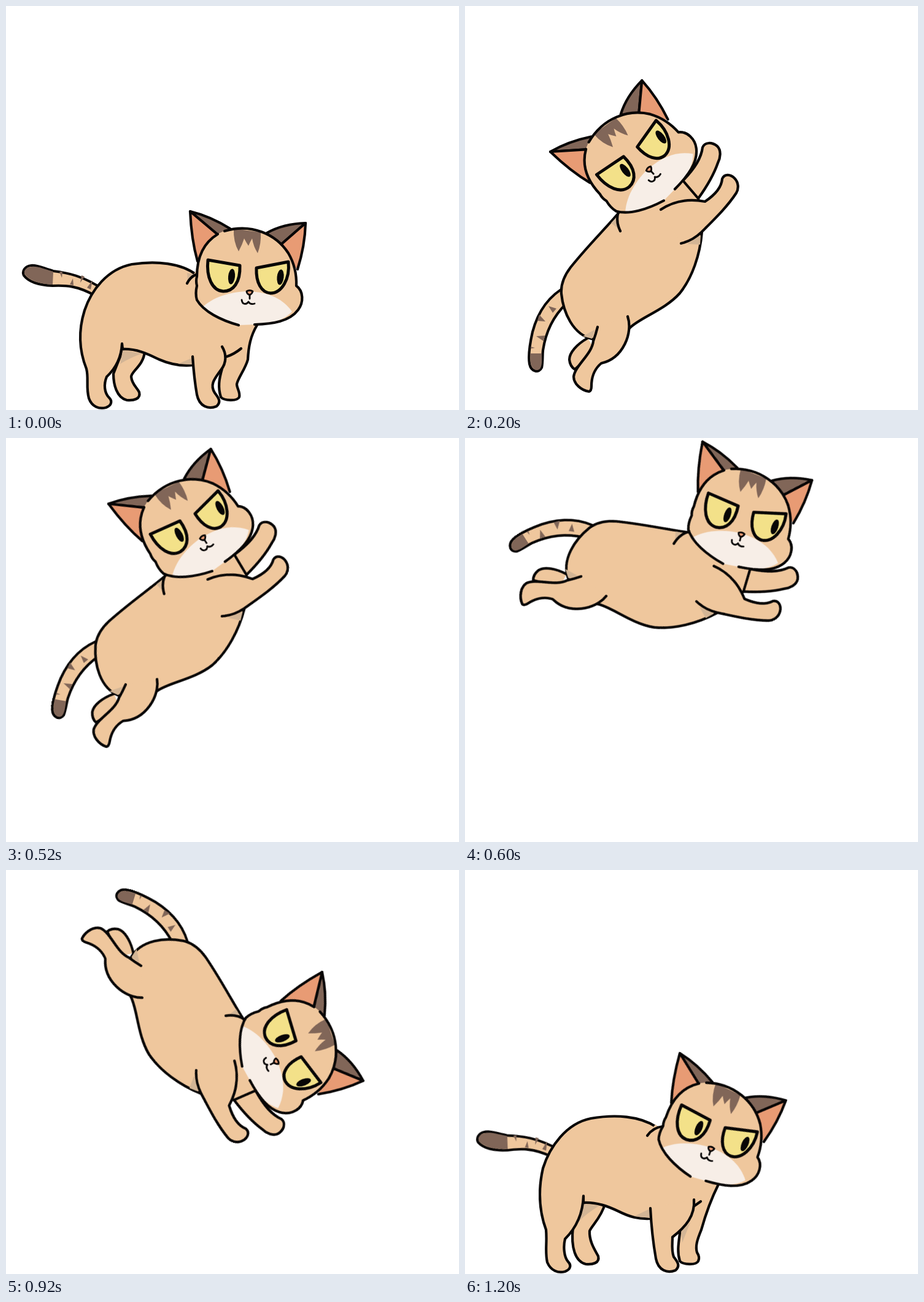
An HTML page without scripts that plays this animation: 738x657 px, repeating every 1.4 s.

```html
<!DOCTYPE html>
<html lang="en">
<head>
<meta charset="utf-8">
<title>Leaping cat</title>
<style>
html, body { margin: 0; width: 100%; height: 100%; overflow: hidden; background: #fff; }
svg { display: block; width: 100%; height: 100%; }
path, ellipse { fill: var(--fur); stroke: #080606; stroke-width: 4.2; stroke-linecap: round; stroke-linejoin: round; }
svg { --fur: #efc79d; --dark: #816658; --pink: #e89b74; }
.line { fill: none; }
.flat { stroke: none; }
.dark { fill: var(--dark); }
.pink { fill: var(--pink); }
.white { fill: #f7eee7; }
.shade { fill: #d3b595; stroke: none; }
.eye { fill: #f3e189; stroke-width: 5; }
.pupil { fill: #080606; stroke: none; }
.thin { stroke-width: 2.8; }

.stand, .jump, .land { opacity: 0; animation: 1.4s step-end infinite; }
.stand { animation-name: stand; }
.jump { animation-name: jump; transform-origin: 139px 237px; }
.land { animation-name: land; }
@keyframes stand { 0% { opacity: 1 } 14.28%, 100% { opacity: 0 } }
@keyframes land { 0% { opacity: 0 } 85.71%, 100% { opacity: 1 } }
@keyframes jump {
  0% { opacity: 0; transform: none }
  14.28% { opacity: 1; transform: none }
  28.57% { opacity: 1; transform: translate(28px, -130px) rotate(9.7deg) }
  42.85% { opacity: 1; transform: translate(248px, -231px) rotate(57.2deg) }
  57.14% { opacity: 1; transform: translate(376px, -71px) rotate(107.1deg) }
  71.42% { opacity: 1; transform: translate(387px, 117px) rotate(124.6deg) }
  85.71%, 100% { opacity: 0; transform: none }
}
</style>
</head>
<body>
<svg viewBox="0 0 738 657" preserveAspectRatio="none">
<defs>
  <g id="head">
    <!-- ears -->
    <path class="dark" d="M344 371L300 334Q333 342 365 362L356 376"/>
    <path class="pink" d="M312 415Q302 380 300 334L344 371L340 400"/>
    <path class="dark" d="M449 387L488 353Q452 354 425 369L436 385"/>
    <path class="pink" d="M475 428Q487 390 488 353L449 387L455 410"/>
    <!-- face -->
    <path class="flat" d="M311 440C311 390 340 361 385 361C435 361 474 400 473 455C485 464 485 482 476 494C462 513 435 517 405 518L379 519C350 511 322 497 311 478Q309 465 311 455z"/>
    <path class="flat dark" d="M371 362L415 368Q416 386 410 402Q403 391 401 378Q398 383 395 390Q391 384 388 378Q385 388 379 399Q370 383 371 362z"/>
    <path class="flat white" d="M321 489C342 470 372 464 397 464C430 466 452 477 466 497C449 514 428 517 405 518L379 519Q344 509 321 489z"/>
    <path class="line" d="M345 371C320 386 311 412 311 440Q309 447 311 455Q308 468 311 478C322 497 350 511 379 519M356 366C400 353 440 371 460 402Q474 426 473 455C485 464 485 482 476 494C462 513 435 517 405 518"/>
    <!-- eyes -->
    <path class="eye" d="M329 413L381 422C382 450 370 464 354 464C336 463 326 441 329 413z"/>
    <ellipse class="pupil" cx="367.500" cy="440" rx="5.500" ry="12.500" transform="rotate(6 367 440)"/>
    <path class="eye" d="M408 426L460 416C463 444 449 467 431 467C416 466 407 450 408 426z"/>
    <ellipse class="pupil" cx="447" cy="441" rx="5.500" ry="12.500" transform="rotate(6 447 441)"/>
    <!-- nose and mouth -->
    <path class="pink thin" d="M392 464Q397 461 402 464Q401 468 397 470Q392 468 392 464z"/>
    <path class="line thin" d="M397 470V476M384 478C385 486 392 486 395 481Q398 486 405 484"/>
  </g>

  <g id="tail">
    <path d="M160 462C125 438 100 434 77 431C62 427 52 421 41 422C30 423 26 432 29 438C37 449 55 454 76 455C98 454 117 455 145 471"/>
    <path class="flat dark" d="M77 432C62 428 52 423 42 424C31 425 28 432 31 437C39 447 56 452 76 453zM87 432L92 432L91 442zM104 453L109 443L110 454zM123 438L128 440L121 450zM132 458L141 446L138 461z"/>
  </g>
</defs>

<g class="stand">
  <use href="#tail"/>
  <path d="M226 562C224 585 204 594 204 603C205 615 213 620 217 628C220 639 208 642 197 641C180 637 175 615 175 598L192 555"/>
  <path class="shade" d="M190 560L222 565Q204 571 186 582z"/>
  <path d="M310 437C285 418 245 414 205 420C165 428 139 462 128 495C117 530 119 560 131 590C135 606 130 620 135 638C140 652 152 656 163 653C173 649 173 642 168 637C160 629 159 615 164 603C180 588 188 570 189 549L190 558C215 557 235 568 250 575C268 583 285 586 305 584"/>
  <path class="flat" d="M290 460L310 430L400 490L409 519L355 590L290 570z"/>
  <path class="shade" d="M280 582L304 572V583zM295 434L308 437L296 448z"/>
  <path d="M409 519C398 537 395 555 394 575C390 590 378 605 376 615C376 622 382 628 380 636C377 643 355 642 350 636C345 620 347 607 352 590"/>
  <path d="M304 570C306 600 308 615 311 632C315 652 330 656 343 651C352 643 345 636 340 629C331 615 341 605 350 592C360 580 359 565 352 554"/>
  <path class="line" d="M360 570Q372 566 383 557M309 437Q300 441 295 451"/>
  <use href="#head"/>
</g>

<g class="jump">
  <path d="M165 456C135 472 118 500 110 530C105 552 103 570 105 582C108 596 121 597 125 588C127 578 126 570 127 560C130 540 138 510 165 484"/>
  <path class="flat dark" d="M106 565H125C125 576 126 585 122 590C116 595 109 590 107 581zM107 554L114 556L107 557zM116 537L130 536L128 545zM121 502L131 513L118 512zM136 488L149 492L143 499z"/>
  <path d="M356 283C375 263 385 247 387 230C391 221 402 221 411 228C418 235 416 247 412 255C404 278 393 295 380 313"/>
  <path d="M200 540C182 550 170 564 170 575Q171 586 179 591L212 560"/>
  <path d="M249 338C225 366 200 390 172 425C159 442 156 456 157 468C160 497 175 535 209 542L268 524C284 507 325 495 350 467C370 442 383 405 386 367L380 313L356 285L300 260z"/>
  <path class="shade" d="M247 343L250 362L238 353zM362 387L384 373L383 388zM192 537L212 526L207 541z"/>
  <path class="line" d="M249 338Q246 352 253 366"/>
  <path d="M319 331C340 317 365 313 391 318C406 308 418 295 419 281C423 272 433 274 439 280C446 287 446 297 442 304C427 327 406 347 385 368Q370 382 352 386"/>
  <path d="M265 505C274 531 258 573 222 581C210 591 206 604 206 618Q206 626 202 627C189 625 177 614 177 603C179 585 207 566 209 545Q213 534 216 522"/>
  <use href="#head" transform="translate(-161 -97) rotate(-43.6 300 334)"/>
</g>

<g class="land">
  <use href="#tail" transform="translate(-8 5) rotate(-5 28 432)"/>
  <path d="M228 543C222 565 207 578 203 587C202 605 213 620 217 628C220 639 208 642 197 641C180 637 172 615 176 580L195 540"/>
  <path class="shade" d="M193 543L219 546Q198 558 183 574z"/>
  <path d="M312 418C285 400 245 397 205 404C165 412 138 450 127 485C119 520 121 555 132 585C134 606 130 620 134 638C140 652 152 656 163 653C173 649 173 642 168 637C161 629 160 612 163 600C180 583 192 560 193 530V541C215 540 233 547 250 555C268 564 282 568 302 567"/>
  <path class="flat" d="M290 440L310 414L400 480L413 511L355 590L290 555z"/>
  <path class="shade" d="M276 563L301 551V566z"/>
  <path d="M413 511C400 537 392 560 385 585C378 602 375 612 378 622C382 628 382 632 380 636C377 643 355 642 350 636C345 620 348 607 351 583"/>
  <path class="shade" d="M352 588L367 573L354 606z"/>
  <path d="M302 550C304 590 308 615 311 632C315 652 330 656 343 651C352 643 345 636 340 629C336 618 338 607 338 597C360 580 375 562 373 536"/>
  <path class="line" d="M374 546L384 539M297 432Q306 419 322 417"/>
  <use href="#head" transform="translate(50 -36) rotate(18.2 300 334)"/>
</g>
</svg>
</body>
</html>
```
